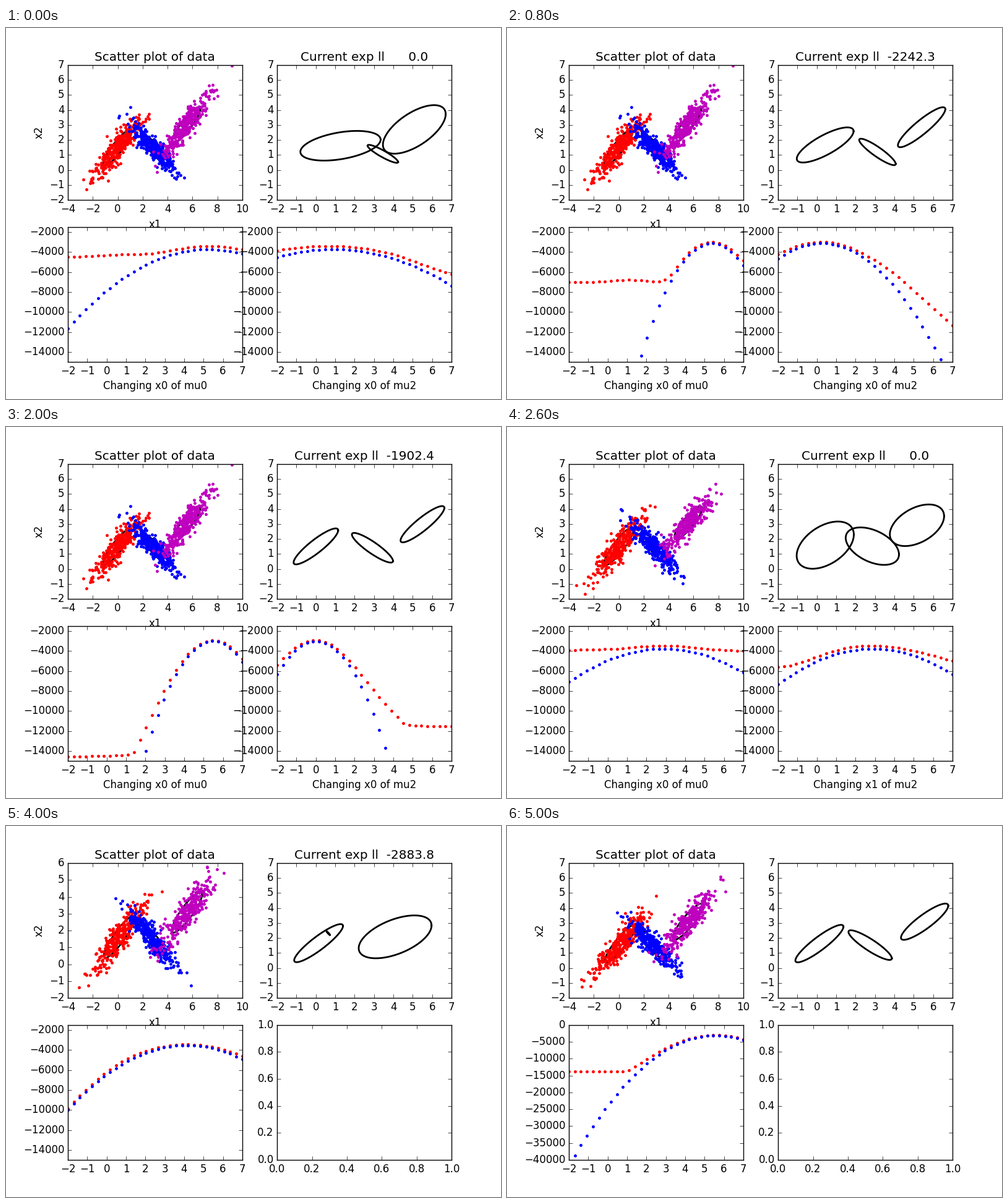
These frames come from a looping animation (800 by 600 pixels, 5.2 s). A matplotlib script:

```python
import numpy as np
import matplotlib.pyplot as plt
from matplotlib.animation import FuncAnimation

plt.style.use("classic")
plt.rcParams["font.family"] = "DejaVu Sans"

STEPS, INTERVAL = 26, 200
GRID = np.linspace(-2, 7, 30)
TURN = np.linspace(0, 2 * np.pi, 200)
COUNT = 330                         # points per cluster
SCALE = np.sqrt(2 * np.log(2))      # ellipses enclose half of each cluster
COLORS = "rbm"


def smooth(q, x, y):
    """Monotone cubic interpolation of the rows of y at the point q."""
    x, y = np.asarray(x, float), np.asarray(y, float)
    h = np.diff(x)[:, None]
    d = np.diff(y, axis=0) / h
    a, b = d[:-1], d[1:]
    same = a * b > 0
    inner = np.where(same, 2 * a * b / np.where(same, a + b, 1), 0)
    m = np.vstack([d[:1], inner, d[-1:]])
    i = np.clip(np.searchsorted(x, q, side="right") - 1, 0, len(x) - 2)
    t = (q - x[i]) / h[i]
    return ((1 + 2 * t) * (1 - t) ** 2 * y[i] + t * (1 - t) ** 2 * h[i] * m[i]
            + t * t * (3 - 2 * t) * y[i + 1] + t * t * (t - 1) * h[i] * m[i + 1])


def state(ll, *shapes):
    """Expected likelihood and three ellipses as one flat vector."""
    return np.concatenate([[ll], np.ravel(shapes)])


def shapes_of(vector):
    return vector[1:].reshape(3, 5)


def mix(a, b, t):
    return a + (b - a) * t


def loosen(vector, ll):
    """A rounder, wider, more central guess that settles into the given state."""
    shapes = shapes_of(vector).copy()
    shapes[:, :2] = mix(shapes[:, :2], shapes[:, :2].mean(axis=0), .15)
    shapes[:, 2:4] *= 1.25
    shapes[:, 4] *= .5
    return state(ll, shapes)


# ellipse: centre x, centre y, half width, half height, correlation
A = [state(-3300, (1.27, 1.62, 2.07, .99, .41), (3.455, 1.08, .79, .60, -.91),
           (5.08, 2.71, 1.62, 1.62, .63)),
     state(-2677.1, (.85, 1.72, 1.79, 1.11, .6), (3.285, 1.10, .87, .79, -.92),
           (5.33, 2.75, 1.30, 1.45, .895)),
     state(-1990.1, (.14, 1.6, 1.24, 1.2, .885), (3.01, 1.33, 1.0, .94, -.89),
           (5.45, 2.95, 1.18, 1.26, .902)),
     state(-1902.4, (0, 1.51, 1.15, 1.2, .89), (2.92, 1.42, 1.06, .99, -.89),
           (5.5, 2.99, 1.13, 1.21, .896))]
B = state(-1959.5, (.01, 1.52, 1.18, 1.26, .89), (2.87, 1.44, 1.1, 1.0, -.885),
          (5.58, 3.08, 1.12, 1.11, .875))
C = state(-2883.8, (.14, 1.66, 1.26, 1.27, .9), (.635, 2.33, .09, .125, -.95),
          (4.09, 2.08, 1.88, 1.43, .53))
D = state(0, (.13, 1.63, 1.24, 1.25, .9), (2.75, 1.53, 1.12, .99, -.89),
          (5.56, 3.09, 1.22, 1.21, .88))
B0, C0 = loosen(B, -2900), loosen(C, -3150)


def sample(seed, shapes):
    """One Gaussian cloud per ellipse."""
    rng = np.random.default_rng(seed)
    clouds = []
    for cx, cy, sx, sy, r in shapes:
        z = rng.normal(size=(COUNT, 2))
        u, v = ((z - z.mean(axis=0)) / z.std(axis=0)).T / SCALE
        clouds.append(np.column_stack([cx + sx * u,
                                       cy + sy * (r * u + np.sqrt(1 - r * r) * v)]))
    return clouds


def log_density(points, cx, cy, sx, sy, r):
    sx, sy, k = sx / SCALE, sy / SCALE, 1 - r * r
    u, v = (points[:, 0] - cx) / sx, (points[:, 1] - cy) / sy
    return (-np.log(2 * np.pi * sx * sy * np.sqrt(k))
            - (u * u - 2 * r * u * v + v * v) / (2 * k))


def likelihoods(points, shapes, j, axis):
    """Expected and full log likelihood while one mean coordinate of shape j sweeps GRID."""
    dens = np.array([log_density(points, *s) for s in shapes])
    weights = np.full(3, 1 / 3)
    for _ in range(20):
        scores = dens + np.log(weights + 1e-9)[:, None]
        resp = np.exp(scores - scores.max(axis=0))
        resp /= resp.sum(axis=0)
        weights = resp.mean(axis=1)
    moved = list(shapes[j])
    moved[axis] = GRID[:, None]
    swept = log_density(points, *moved) + np.log(weights[j] + 1e-9)
    rest = np.delete(scores, j, axis=0)
    expected = (resp[j] * swept).sum(axis=1) + (np.delete(resp, j, axis=0) * rest).sum()
    full = np.logaddexp(np.logaddexp(*rest), swept).sum(axis=1)
    return expected, full


# first step, key times, key states, data, scatter top, sweeps (mu, coordinate, ellipse)
RUNS = [
    (0, [0, 2, 6, 10, 12], A + [mix(A[2], A[3], 1.1)],
     sample(3, shapes_of(A[3])), 7, [(0, 0, 2), (2, 0, 0)]),
    (13, [13, 15, 17], [B0, mix(B0, B, .75), B],
     sample(5, shapes_of(B)), 7, [(0, 0, 1), (2, 1, 2)]),
    (18, [18, 20, 24], [C0, C, mix(C0, C, 1.08)],
     sample(8, shapes_of(D)), 6, [(0, 0, 2)]),
    (25, [25, 26], [D, D], sample(11, shapes_of(D)), 7, [(0, 0, 2)]),
]

fig, axes = plt.subplots(2, 2, figsize=(8, 6), dpi=100, facecolor="white")
scatter_ax, model_ax = axes[0]


def frame_axes(ax, xlim, dx, ylim, dy):
    ax.set(xlim=xlim, ylim=ylim)
    ax.set_xticks(np.arange(xlim[0], xlim[1] + dx / 2, dx))
    start = np.ceil(ylim[0] / dy) * dy
    ax.set_yticks(np.arange(start, ylim[1] + dy / 100, dy))


def draw_ellipse(ax, cx, cy, sx, sy, r):
    ax.plot(cx + sx * np.cos(TURN), cy + sy * np.cos(TURN - np.arccos(r)), "k", lw=2)


def dots(ax, x, y, color):
    ax.plot(x, y, ".", color=color, mec=color)


def update(step):
    first, times, states, clouds, top, sweeps = [r for r in RUNS if r[0] <= step][-1]
    now = smooth(step, times, states)
    shapes = shapes_of(now)
    last = step == STEPS - 1
    for ax in axes.flat:
        ax.clear()

    for shape in shapes_of(D if first == 18 else states[-1]):
        draw_ellipse(scatter_ax, *shape)
    for color, cloud in zip(COLORS, clouds):
        dots(scatter_ax, *cloud.T, color)
    frame_axes(scatter_ax, (-4, 10), 2, (-2, top), 1)
    scatter_ax.set(title="Scatter plot of data", xlabel="x1", ylabel="x2")

    for shape in shapes:
        draw_ellipse(model_ax, *shape)
    frame_axes(model_ax, (-2, 7), 1, (-2, 7), 1)
    if not last:
        model_ax.set_title("Current exp ll %8.1f" % (0 if step == first else now[0]))

    points = np.vstack(clouds)
    frame_axes(axes[1, 1], (0, 1), .2, (0, 1), .2)
    for ax, (mu, axis, j) in zip(axes[1], sweeps):
        expected, full = likelihoods(points, shapes, j, axis)
        dots(ax, GRID, full, "r")
        dots(ax, GRID, expected, "b")
        if last:
            frame_axes(ax, (-2, 7), 1, (-40000, 0), 5000)
        else:
            frame_axes(ax, (-2, 7), 1, (-15000, -1500), 2000)
        if len(sweeps) == 2:
            ax.set_xlabel("Changing x%d of mu%d" % (axis, mu))
    return []


anim = FuncAnimation(fig, update, frames=STEPS, init_func=lambda: update(0),
                     interval=INTERVAL, repeat=True, repeat_delay=0, blit=False)
plt.show()
```
